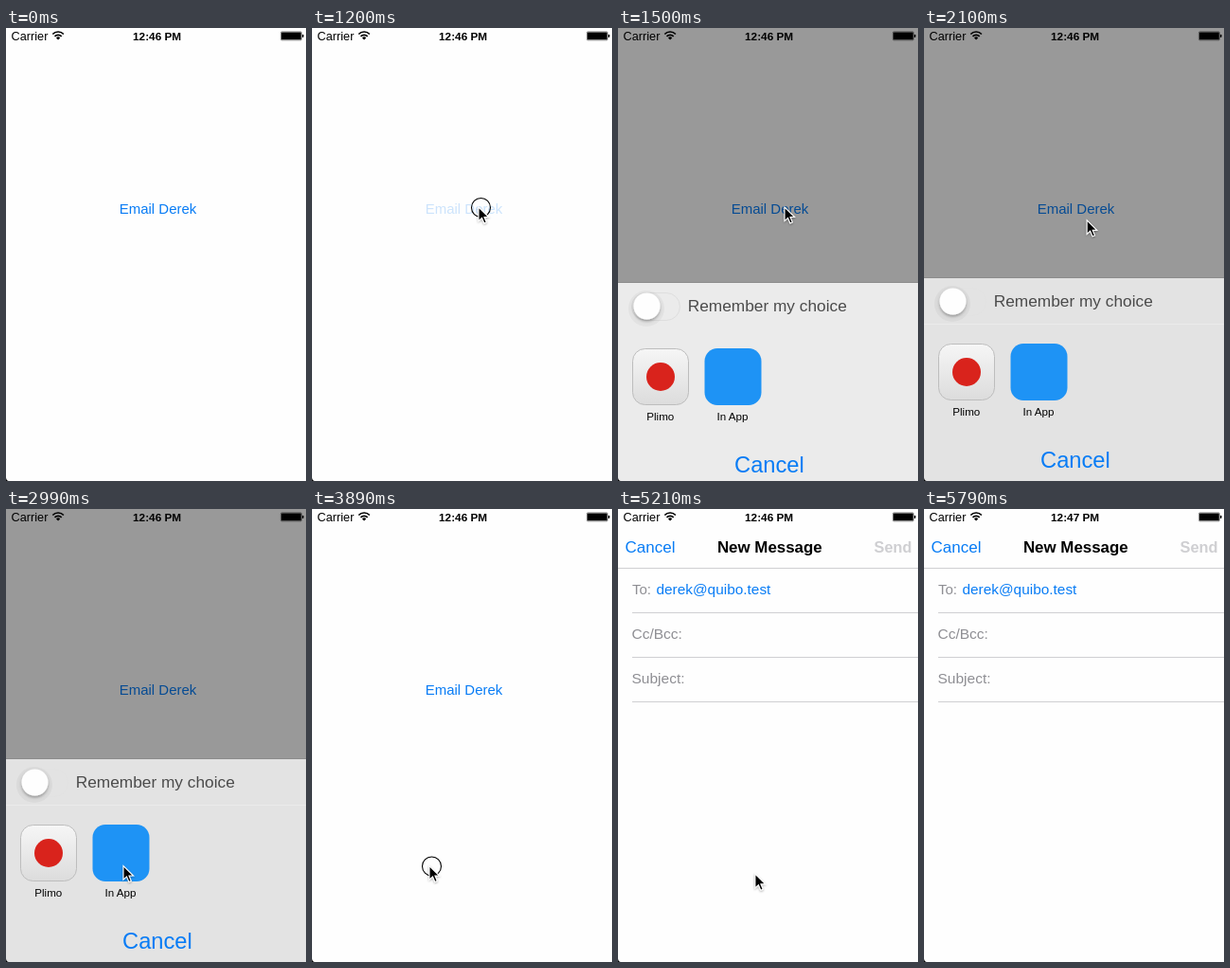
An HTML page for the animation above (6.08 s loop, 317 by 478 pixels).

```html
<!DOCTYPE html>
<html lang="en">
<head>
<meta charset="utf-8">
<title>Email chooser</title>
<style>
  html, body { margin: 0; width: 100%; height: 100%; overflow: hidden; background: #fefefe; }
  svg { display: block; width: 100%; height: 100%; }
  text { font-family: "Liberation Sans", Arial, sans-serif; }
  .blue { fill: #087cf5; }
  .bold { font-weight: bold; }
  .mid { text-anchor: middle; }
  .field { font-size: 15.5px; fill: #8e8e93; }
  .rule { stroke: #cfcfd2; }
</style>
</head>
<body>
<svg viewBox="0 0 317 478">
  <defs>
    <linearGradient id="tile" x2="0" y2="1">
      <stop stop-color="#f6f6f6"/><stop offset="1" stop-color="#dcdcdc"/>
    </linearGradient>
    <filter id="soft" x="-50%" y="-50%" width="200%" height="200%">
      <feDropShadow dx="0" dy="2" stdDeviation="1.8" flood-opacity=".3"/>
    </filter>
    <filter id="lift" x="-50%" y="-50%" width="200%" height="200%">
      <feDropShadow dx="0" dy="1" stdDeviation=".8" flood-opacity=".35"/>
    </filter>
  </defs>

  <rect width="317" height="478" fill="#fefefe"/>
  <text id="link" class="blue mid" x="160.5" y="195.5" font-size="15">Email Derek</text>

  <g id="compose">
    <rect width="317" height="478" fill="#fefefe"/>
    <g font-size="17">
      <text class="blue" x="7.5" y="46">Cancel</text>
      <text class="bold mid" x="160.3" y="46" font-size="16.9">New Message</text>
      <text class="bold" x="270.5" y="46" font-size="16.4" fill="#cfcfd2">Send</text>
    </g>
    <path class="rule" d="M0 62.5H317M15 109.5H317M15 156.5H317M15 203.5H317"/>
    <text class="field" x="15" y="90" style="font-size:15px">To:</text>
    <text class="blue" x="40.5" y="90" font-size="15.4">derek@quibo.test</text>
    <text class="field" x="14.5" y="137">Cc/Bcc:</text>
    <text class="field" x="14.5" y="184">Subject:</text>
  </g>

  <text x="5.6" y="12.6" font-size="12.7">Carrier</text>
  <path d="M49.3 6.5A8 8 0 0 1 60.9 6.5M51.5 8.9A5 5 0 0 1 58.7 8.9" fill="none" stroke="#000" stroke-width="1.7"/>
  <path d="M55.1 12.6L53 10.4A3 3 0 0 1 57.2 10.4Z"/>
  <text id="clock" class="bold mid" x="159.6" y="12.5" font-size="11.8"></text>
  <rect x="290.4" y="3.9" width="22" height="9" rx="1.2" fill="none" stroke="#000" stroke-opacity=".55" stroke-width=".8"/>
  <rect x="291" y="4.5" width="20.8" height="7.8" rx=".6"/>
  <rect x="313" y="6.8" width="1.5" height="3.2" rx=".7"/>

  <rect id="dim" width="317" height="478"/>

  <g id="sheet">
    <path d="M0 263.5H317" stroke="#8c8c8c"/>
    <rect id="panel" y="264" width="317" height="220"/>
    <path id="divider" d="M0 312.5H317" stroke="#ebebeb"/>
    <rect id="track" x="14.5" y="274.5" width="51" height="29" rx="14.5" fill="none" stroke="#dedede"/>
    <circle cx="30" cy="291" r="19" fill-opacity=".04"/>
    <circle cx="30.5" cy="288.5" r="14" fill="#fefefe" filter="url(#soft)"/>
    <text x="73.7" y="294" font-size="17.3" fill="#4b4b4b">Remember my choice</text>
    <rect x="15.5" y="333.5" width="59" height="59" rx="13" fill="url(#tile)" stroke="#bdbdbd"/>
    <circle cx="45" cy="363" r="15" fill="#d9231c"/>
    <rect x="91.5" y="333" width="60" height="60" rx="13.5" fill="#1e93f5"/>
    <g class="mid" font-size="11.6">
      <text x="44.8" y="409">Plimo</text>
      <text x="121" y="409">In App</text>
    </g>
    <text class="blue mid" x="159.9" y="464" font-size="23.7">Cancel</text>
  </g>

  <g id="pointer">
    <circle id="tap" cx="2.5" cy=".5" r="10" fill="none" stroke="#000" stroke-width="1.1"/>
    <path d="M0 0V14.6L3.5 11.4L5.9 17L8.3 16L6 10.5H10.6Z" stroke="#fff" stroke-width="1.1" filter="url(#lift)"/>
  </g>

  <path d="M0 474.5Q.4 477.6 3 478H0Z"/>
</svg>

<script>
// The screen refreshes in even beats; all timing below counts beats.
const LOOP = 6080, BEATS = 41;
const el = id => document.getElementById(id);
const progress = (n, from, to) => Math.min(1, Math.max(0, (n - from) / (to - from)));
const smooth = p => p * p * (3 - 2 * p);
const easeOut = p => 1 - (1 - p) ** 3;
const mix = (a, b, p) => a.map((v, i) => v + (b[i] - v) * p);

const entry = [317, 420], link = [176, 189], app = [124, 376.5], exit = [325, 460];

function pointerAt(n) {
  if (n < 13) return mix(entry, link, easeOut(progress(n, 2, 7)));
  if (n < 34) return mix(link, app, smooth(progress(n, 13, 19)));
  return mix(app, exit, smooth(progress(n, 34, 39)));
}

function place(id, shown, [x, y]) {
  el(id).style.display = shown ? "" : "none";
  el(id).setAttribute("transform", `translate(${x} ${y})`);
}

function draw(n) {
  const open = n >= 9 && n < 26, settled = n >= 11;
  place("pointer", n >= 3 && n < 39, pointerAt(n));
  place("sheet", open, [0, Math.round(70 * Math.exp(-2.64 * (n - 9)))]);
  place("compose", n >= 27, [0, 300 * (1 - easeOut(progress(n, 27, 30)))]);
  el("tap").style.opacity = n === 8 || n === 26 ? 1 : 0;
  el("link").style.opacity = n === 8 ? .2 : 1;
  el("dim").style.opacity = open ? .4 * progress(n, 8, 10) : 0;
  el("panel").style.fill = settled ? "#e3e3e3" : "#ebebeb";
  el("divider").style.opacity = settled ? 1 : 0;
  el("track").style.opacity = settled ? .3 : 1;
  el("clock").textContent = n < 39 ? "12:46 PM" : "12:47 PM";
}

const start = performance.now();
function tick() {
  const t = (performance.now() - start) % LOOP;
  draw(Math.floor(t / LOOP * BEATS));
  requestAnimationFrame(tick);
}
tick();
</script>
</body>
</html>
```
